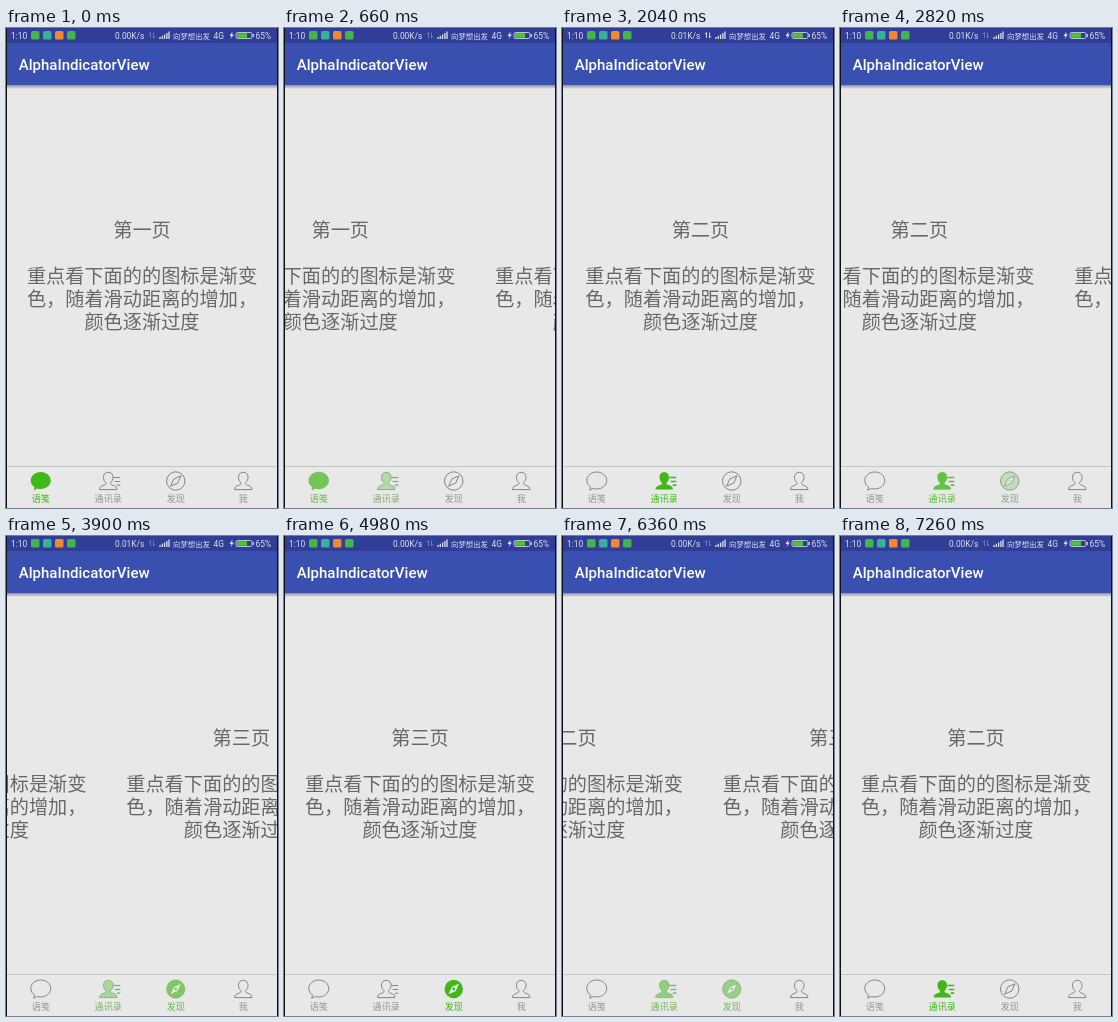
An HTML page for the animation above (7320 ms loop, 272 px wide and 480 px high).

```html
<!DOCTYPE html>
<html lang="zh-CN">
<head>
<meta charset="utf-8">
<style>
  html, body { margin: 0; width: 100%; height: 100%; overflow: hidden; background: #e8e8e8; }
  svg { display: block; width: 272px; height: 480px; }
  text { font-family: Roboto, "Noto Sans CJK SC", "Noto Sans CJK", sans-serif; }
  .page { font-size: 19.2px; fill: #686868; text-anchor: middle; }
  .status { font-size: 8.4px; fill: #dcdff2; }
  .label { font-size: 9.1px; text-anchor: middle; }
  .off { fill: none; stroke: #858585; stroke-width: 1; stroke-linejoin: round; }
  .off .label { fill: #969696; stroke: none; }
  .on { fill: #40b818; }
  .on .label { font-weight: 500; }
  .on .hole { fill: #f0f4ee; }
  .on .bars { stroke: #40b818; stroke-width: 1.7; }
</style>
</head>
<body>
<svg viewBox="0 0 272 480">
  <defs>
    <linearGradient id="shade" x2="0" y2="1">
      <stop stop-color="#000" stop-opacity=".38"/>
      <stop offset="1" stop-color="#000" stop-opacity="0"/>
    </linearGradient>
    <!-- icons are centred on 0,0 -->
    <path id="bubble" d="M0-9C5.7-9 10-5.200 10-.5S5.700 8 0 8Q-1.800 8-3.400 7.500L-7 9.200-6.300 6Q-10 3.500-10-.5C-10-5.200-5.700-9 0-9Z"/>
    <path id="person" d="M0-8.700C3-8.700 4.800-6.600 4.800-3.800 4.800-1.600 3.800.4 2.300 1.700 2 3 2.600 3.500 4.200 4.100 7.200 5.200 8.700 6 8.700 8.600H-8.700C-8.700 6-7.200 5.200-4.200 4.100-2.600 3.500-2 3-2.300 1.700-3.800.4-4.800-1.600-4.800-3.800-4.800-6.600-3-8.700 0-8.700Z"/>
    <path id="bars" d="M5-3.500H12M6.500.5H12M8.500 4.200H12"/>
    <path id="needle" d="M5.200-5.200 2 2-5.200 5.200-2-2Z"/>
  </defs>
  <rect width="272" height="480" fill="#e8e8e8"/>
  <g id="pages"></g>

  <rect y="57" width="272" height="4" fill="url(#shade)"/>
  <rect y="14" width="272" height="43" fill="#3a50b1"/>
  <rect width="272" height="15" fill="#303e98"/>
  <text x="12.700" y="42" font-size="15" font-weight="500" fill="#fff">AlphaIndicatorView</text>

  <g class="status">
    <text x="5" y="10.600">1:10</text>
    <text id="speed" x="109" y="10.600"></text>
    <text x="167" y="10.600" font-size="7.400">向梦想出发</text>
    <text x="207.500" y="10.600">4G</text>
    <text x="249.500" y="10.600">65%</text>
  </g>
  <g id="apps"></g>
  <path id="arrows" d="M144.500 10V4.500L143 6.300M147.500 4.500V10L149 8.200" fill="none" stroke="#dcdff2" stroke-width=".9"/>
  <path d="M154 11V9M156.300 11V7.800M158.600 11V6.400M160.900 11V5M163 11V3.600" stroke="#dcdff2" stroke-width="1.300"/>
  <path d="M226.500 3.500 223.500 8H225.500L224.500 11 228 6.600H226Z" fill="#dcdff2"/>
  <rect x="230" y="4.500" width="16" height="6" rx="1.500" fill="none" stroke="#b9c3cf"/>
  <rect x="231" y="5.200" width="10" height="4.600" fill="#48c832"/>
  <rect x="246.500" y="6" width="1.500" height="3" fill="#b9c3cf"/>

  <path d="M0 438.500H272" stroke="#c5c5c5"/>
  <g id="tabs"></g>
  <path d="M.5 0V480M271.500 0V480" stroke="#111"/>
</svg>
<script>
const $ = id => document.getElementById(id);
const LOOP = 7320, STEP = 60, WIDTH = 270;

// time in ms, scroll position in pages
const keys = [
  [0, 0], [1320, .726], [2160, 1], [2280, 1], [2820, 1.21], [3900, 1.632],
  [4620, 1.945], [4800, 2.05], [4980, 2], [5220, 2], [6360, 1.482], [7260, 1], [LOOP, 1]
];
const rate = i => (keys[i + 1][1] - keys[i][1]) / (keys[i + 1][0] - keys[i][0]);

function slope(i) {
  if (i < 1 || i > keys.length - 2) return 0;
  const a = rate(i - 1), b = rate(i);
  return a * b > 0 ? 2 * a * b / (a + b) : 0;
}

// monotone cubic through the keys
function scrollAt(t) {
  let i = 0;
  while (i < keys.length - 2 && t >= keys[i + 1][0]) i++;
  const [t0, p0] = keys[i], [t1, p1] = keys[i + 1];
  const h = t1 - t0, u = (t - t0) / h, v = 1 - u;
  return p0 * v * v * (1 + 2 * u) + p1 * u * u * (3 - 2 * u)
    + h * u * v * (slope(i) * v - slope(i + 1) * u);
}

const lines = ['重点看下面的的图标是渐变', '色，随着滑动距离的增加，', '颜色逐渐过度'];
$('pages').innerHTML = ['一', '二', '三', '四'].map(n =>
  `<g class="page"><text x="136" y="209.300">第${n}页</text>` +
  lines.map((s, i) => `<text x="136" y="${255 + i * 22.8}">${s}</text>`).join('') + '</g>').join('');

$('apps').innerHTML = ['#43b649', '#38b09a', '#ee8a2c', '#43b649'].map((c, i) =>
  `<rect x="${25 + i * 12}" y="3" width="8.500" height="8.500" rx="1.500" fill="${c}"/>`).join('');

const use = (id, cls = '') => `<use href="#${id}" class="${cls}"/>`;
const disc = '<circle r="9.200"/>';
const tabs = [
  ['语笺', use('bubble'), use('bubble')],
  ['通讯录', use('person') + use('bars'), use('person') + use('bars', 'bars')],
  ['发现', disc + use('needle'), disc + use('needle', 'hole') + '<circle r="1.400"/>'],
  ['我', use('person'), use('person')]
];
$('tabs').innerHTML = tabs.map(([name, off, on], i) => {
  const layer = (cls, icon) => `<g class="${cls}">${icon}<text class="label" y="21.400">${name}</text></g>`;
  return `<g transform="translate(${34.75 + i * 67.5} 453)">${layer('off', off)}${layer('on', on)}</g>`;
}).join('');

const pages = [...$('pages').children], items = [...$('tabs').children];

function draw(now) {
  const t = Math.floor(now % LOOP / STEP) * STEP, p = scrollAt(t);
  pages.forEach((g, i) => g.setAttribute('transform', `translate(${(i - p) * WIDTH} 0)`));
  items.forEach((g, i) => {
    const a = Math.max(0, 1 - Math.abs(i - p));
    g.children[0].setAttribute('opacity', 1 - a);
    g.children[1].setAttribute('opacity', a);
  });
  $('speed').textContent = t >= 960 && t < 4200 ? '0.01K/s' : '0.00K/s';
  $('arrows').setAttribute('opacity', t >= 960 && t < 2400 ? 1 : .4);
}

const start = performance.now();
function tick() {
  draw(performance.now() - start);
  requestAnimationFrame(tick);
}
tick();
</script>
</body>
</html>
```
